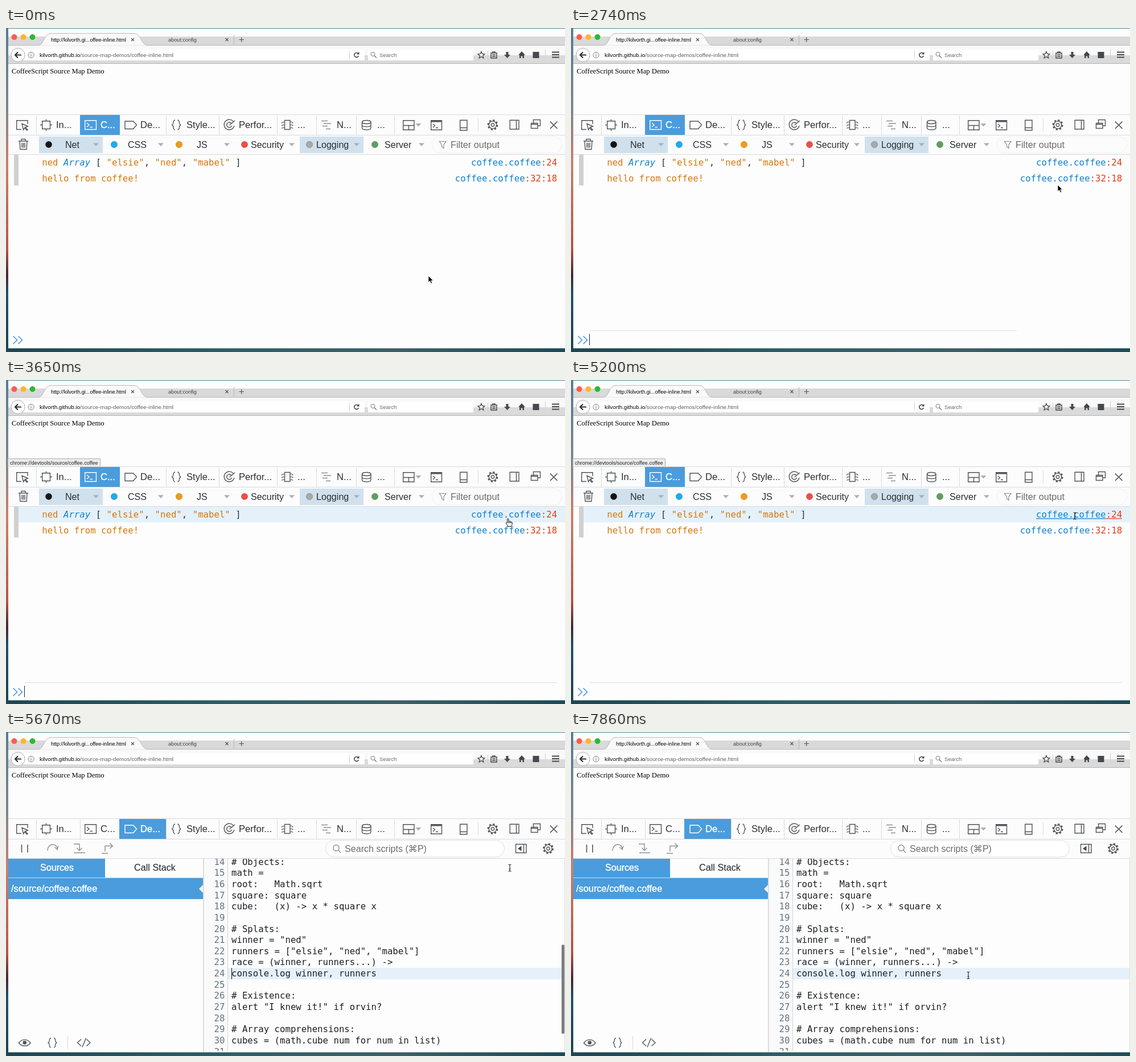
Write an HTML page that moves like this. It is 982 by 570 pixels and loops after 8 s.

```html
<!DOCTYPE html>
<html lang="en">
<head>
<meta charset="utf-8">
<title>Source map demo</title>
<style>
html, body { margin: 0; width: 100%; height: 100%; overflow: hidden; }
svg { display: block; width: 982px; height: 570px; }
text { white-space: pre; font-family: "Liberation Sans", Arial, sans-serif; fill: #2b2f33; }
.mono text { font: 15.7px "DejaVu Sans Mono", Menlo, monospace; }
.page { font-family: "Liberation Serif", Times, serif; }
.strong { stroke: #fff; stroke-width: .4; }
.icon { fill: none; stroke: #50555a; stroke-width: 1.4; }
.thin { stroke-width: 1.2; }
.dim { stroke: #8b8f93; }
.fillIcon { fill: #45494d; }
.line { fill: none; stroke: #d8dadc; }
.tri { fill: #a9b0b8; }
</style>
</head>
<body>
<svg viewBox="0 0 982 570">
  <defs>
    <linearGradient id="desk" x1="0" y1="0" x2="0" y2="1">
      <stop offset="0" stop-color="#527f92"/><stop offset=".25" stop-color="#7f8790"/>
      <stop offset=".42" stop-color="#c98070"/><stop offset=".68" stop-color="#b4574a"/>
      <stop offset=".76" stop-color="#4a2a36"/><stop offset=".82" stop-color="#1f5266"/>
      <stop offset="1" stop-color="#1b4554"/>
    </linearGradient>
    <linearGradient id="floor">
      <stop offset="0" stop-color="#1d4652"/><stop offset=".4" stop-color="#2c5f66"/>
      <stop offset=".7" stop-color="#3b5f66"/><stop offset="1" stop-color="#1c4a58"/>
    </linearGradient>
    <clipPath id="codeArea"><rect x="348" y="223" width="634" height="338"/></clipPath>
    <g id="gear" class="icon">
      <circle r="8.2" stroke-width="2.6" stroke-dasharray="3.2 3.24"/>
      <circle r="6.6"/><circle r="2.8"/>
    </g>
    <path id="tri" class="tri" d="M-5-2.5H5L0 3Z"/>
    <path id="cross" d="M-2.5-2.5 2.5 2.5M2.5-2.5-2.5 2.5"/>
  </defs>

  <!-- desktop and window -->
  <rect width="982" height="570" fill="url(#desk)"/>
  <rect y="563" width="982" height="7" fill="url(#floor)"/>
  <rect x="4" y="1" width="978" height="562.500" fill="#fdfdfd"/>
  <rect x="4" y="15" width="978" height="16" fill="#d9d9d9"/>
  <rect x="4" y="31" width="978" height="17" fill="#f9f9f9"/>
  <rect x="4" y="48" width="978" height="14" fill="#dadada"/>
  <path d="M4 62.5H982" stroke="#b4b4b4"/>
  <path d="M4 30.5H56C68 30 66 9.500 79 9.500H225C238 9.500 236 30 249 30.500H982" fill="#f9f9f9" stroke="#b9b9b9"/>
  <circle cx="14.500" cy="16" r="5" fill="#fc5b52"/>
  <circle cx="30.500" cy="16" r="5" fill="#fdb72a"/>
  <circle cx="46.500" cy="16" r="5" fill="#2bb932"/>
  <g class="icon thin">
    <use href="#cross" x="222.500" y="20.500"/><use href="#cross" x="388" y="20.500"/>
    <path d="M409.500 20.500H418M413.700 16.500V25"/>
  </g>
  <path d="M400.500 12V30" stroke="#bbb"/>

  <!-- address bar -->
  <path d="M30 37.500H630V57H30Z" fill="#fff"/>
  <rect x="636" y="38" width="185" height="19" fill="#fff"/>
  <path d="M603.500 40V55M846.500 40V55M947.500 37V55" stroke="#d0d0d0"/>
  <circle cx="21" cy="47.500" r="12" fill="#fff" stroke="#aaa"/>
  <path d="M27 47.500H17M21 42.500 16 47.500 21 52.500" fill="none" stroke="#333" stroke-width="2.200"/>
  <g fill="none" stroke="#777">
    <circle cx="44" cy="47.500" r="5"/><path d="M44 46.500V50.500M44 44V45.300"/>
    <circle cx="644.500" cy="46" r="3.500"/><path d="M647 48.500 651 52.500" stroke-width="1.500"/>
  </g>
  <path d="M619 45A4 4 0 1 0 619.500 49" fill="none" stroke="#444" stroke-width="1.600"/>
  <path d="M620.500 42V46.500H616Z" class="fillIcon"/>
  <path d="M835 41.500 836.700 45.500 841 46 837.800 48.800 838.800 53 835 50.700 831.200 53 832.200 48.800 829 46 833.300 45.500Z" fill="none" stroke="#45494d" stroke-width="1.300"/>
  <path d="M852 44H862V53H852ZM855 44V42H859V44M854 47H860M854 50H860" fill="none" stroke="#45494d" stroke-width="1.500"/>
  <path class="fillIcon" d="M878.500 42H882.500V47H886L880.500 53 875 47H878.500ZM906 41 912 47.500H910V53H907.500V49.500H904.500V53H902V47.500H900ZM959 41.500H972V43.500H959ZM959 46H972V48H959ZM959 50.500H972V52.500H959Z"/>
  <rect x="925.500" y="42" width="11" height="11" class="fillIcon"/>

  <g id="status">
    <rect x="3.500" y="138.500" width="162" height="15" fill="#ececec" stroke="#b0b0b0"/>
  </g>

  <!-- tool tabs -->
  <path d="M4 153H982V222H4Z" fill="#fcfcfc"/>
  <path class="line" d="M4 152.500H982M4 188.500H982M4 222.500H982M53.500 154V188M130.500 154V188M199.500 154V188M281.500 154V188M374.500 154V188M476.500 154V188M545.500 154V188M615.500 154V188M682.500 154V188M829.500 159V182"/>
  <rect id="activeTab" y="153" height="35" fill="#4a9cdc"/>
  <g class="icon">
    <path d="M27 178.500H18.700V162.700H38V169"/><path d="M28 168.500 38.500 173 34 174.500 38 179 36.500 180 32.800 175.700 30.500 179Z"/>
    <path d="M63.700 163.700H77.500V177.500H63.700ZM60 170.500H64M77.500 170.500H81M70.500 160.500V164M70.500 177.500V181"/>
    <path id="consoleIcon" d="M138.700 162.700H158.500V178.500H138.700ZM142 167 146 170.500 142 174M147.500 174.500H152"/>
    <path id="debugIcon" d="M209 164H223.500L229.500 170.500 223.500 177.500H209Z"/>
    <path d="M297 162C292 162 296 170.500 291 170.500 296 170.500 292 179 297 179M301.500 162C306.500 162 302.500 170.500 307.500 170.500 302.500 170.500 306.500 179 301.500 179"/>
    <path d="M400 165.500A9 9 0 1 0 401 172M396 168A4.500 4.500 0 1 0 396.500 172M392.500 171 402 163"/>
    <path d="M489.500 162.500H499V178.500H489.500Z"/>
    <path class="thin" d="M484 167.500 486 165.500H489M484 172 486 170.500H489M484 176.500 486 175.500H489M504.500 167.500 502.500 165.500H499.500M504.500 172 502.500 170.500H499.500M504.500 176.500 502.500 175.500H499.500"/>
    <path class="dim" d="M554 163.500H565M558 168H571M556 172.500H565M562 177.500H570"/>
    <path d="M625.500 165.500V176C625.500 180 641 180 641 176V165.500M625.500 171C625.500 174.500 641 174.500 641 171"/><ellipse cx="633.250" cy="165.500" rx="7.750" ry="3"/>
    <path d="M697.700 162.700H717V179.300H697.700ZM697.700 171.500H717M707.500 171.500V179.300"/>
    <path d="M746.700 162.700H765.500V179.300H746.700ZM750 169 753.500 172 750 175M755 175.500H759"/><path d="M746.700 164H765.500" stroke-width="3"/>
    <path d="M797.700 162.200H810V180H797.700ZM797.700 175.500H810"/>
    <path d="M885.200 162.200H901V178H885.200ZM896.500 162.200V178"/>
    <path d="M926.500 170V161.500H938.500V172H934M922.500 167.500H934V176.500H922.500ZM922.500 169.500H934"/>
    <path d="M956 164.500 968.500 177M968.500 164.500 956 177" stroke-width="1.700"/>
  </g>
  <use href="#gear" x="855" y="170.500"/><use href="#tri" x="724.500" y="170.500"/>
  <g id="labels"></g>

  <g id="console">
    <g id="filters"></g>
    <g class="icon">
      <path d="M22 199H39M27 199V195.500H34V199M24 199 25 213.500H36L37 199M28 202V210.500M30.500 202V210.500M33 202V210.500"/>
      <path class="dim thin" d="M761.500 199.500H773L769 205.500V211.500L765.500 209V205.500Z"/>
    </g>
    <rect x="748.500" y="191" width="228" height="29" rx="14.500" fill="none" stroke="#e8e8e8" stroke-dasharray="2 1"/>
    <rect id="hover" x="22" width="960" height="27.500" fill="#e4f1fb"/>
    <rect x="14" y="223" width="8" height="54" fill="#d0d0d0"/>
    <g id="rows" class="mono"></g>
    <path id="underline" stroke-width="1.200"/><path id="underlineNum" stroke="#ea3a12" stroke-width="1.200"/>
    <path d="M12.500 542 19.500 549 12.500 556M21.500 542 28.500 549 21.500 556" fill="none" stroke="#4a97e0" stroke-width="1.600"/>
    <path id="inputLine" stroke="#dedede"/>
    <path id="inputCaret" d="M32.500 538V558" stroke="#222"/>
  </g>

  <g id="debugger">
    <path d="M27.500 198V212M38 198V212" stroke="#50555a" stroke-width="1.600"/>
    <g class="icon dim">
      <path d="M73 209C73 195 89 195 90 205M85.500 202.500 90 207 92 200.500"/>
      <path d="M119 197H129V208M124.500 204 129 208.500 133.500 204M120 212.500H139"/>
      <path d="M174 210V200.500H187M182.500 196 187.500 200.500 182.500 205M168 213.500H179"/>
    </g>
    <rect x="561.500" y="190.500" width="314" height="29.500" rx="14.700" fill="#fff" stroke="#dedede"/>
    <g class="icon">
      <path class="dim" d="M585.200 204A5.200 5.200 0 1 0 574.800 204 5.200 5.200 0 1 0 585.200 204M584 208 588 212.500"/>
      <path d="M895.500 197.500H914V212.500H895.500ZM909.500 197.500V212.500"/>
    </g>
    <path d="M905.500 200.500V209.500L899 205Z" class="fillIcon"/>
    <use href="#gear" x="952.500" y="205"/>
    <rect x="4" y="223" width="342" height="340" fill="#fdfdfd"/>
    <rect x="4" y="223" width="170" height="33.500" fill="#4a9cdc"/>
    <path d="M4 256.500H346" stroke="#c8dcec"/>
    <rect x="4" y="257" width="342" height="37" fill="#4a9cdc"/>
    <path d="M346 269 339 276 346 283Z" fill="#f4f4f4"/>
    <path d="M347 223V563" stroke="#dcdcdc" stroke-width="2"/>
    <g class="icon">
      <path d="M22.500 547C28 539.500 37.500 539.500 43 547 37.500 554 28 554 22.500 547Z"/><circle cx="32.800" cy="546.500" r="2.600" fill="#50555a"/>
      <path d="M79 538.500C74.500 538.500 78 546.500 73.500 546.500 78 546.500 74.500 555 79 555M84 538.500C88.500 538.500 85 546.500 89.500 546.500 85 546.500 88.500 555 84 555"/>
      <path d="M132 540.500 125.500 546.500 132 552.500M141.500 540.500 148 546.500 141.500 552.500M140.500 538.500 134 554.500"/>
    </g>
    <path class="line" d="M108.500 535V558"/>
    <g clip-path="url(#codeArea)">
      <rect x="348" y="223" width="41" height="340" fill="#fafafa"/>
      <path d="M389.500 223V564" stroke="#d4d4d4"/>
      <rect x="390" y="415" width="592" height="20" fill="#e6f0fb"/>
      <g id="code" class="mono"></g>
    </g>
    <path id="codeCaret" d="M396.500 415V435" stroke="#111"/>
    <rect id="scrollbar" x="976" y="374" width="5" height="157" rx="2.500" fill="#7d7d7d"/>
    <path d="M981.500 223V563" stroke="#ddd"/>
  </g>

  <g id="cursor">
    <path id="arrow" d="M0 0V11.500L2.700 9 4.700 13.500 6.700 12.600 4.800 8.300H8.300Z" fill="#000" stroke="#fff" stroke-width=".8"/>
    <path id="hand" d="M-1.200 7V.8C-1.200-.5 1-.5 1 .8V5C1.400 4 3 4.200 3.200 5.200 3.800 4.500 5 4.800 5.200 5.800 6.200 5.300 7.200 6 7.200 7V9.500C7.200 11 6 12 6 13.500H-.5C-.8 11.500-2.600 10-3.600 7.800-4 6.500-2.500 6-1.200 7.500ZM1 5V8M3.200 5.500V8M5.200 6V8" fill="#fff" stroke="#111" stroke-width="1"/>
    <path id="beam" d="M-2.500-6C-1-6 0-5.500 0-4.500 0-5.500 1-6 2.500-6M0-4.500V4.500M-2.500 6C-1 6 0 5.500 0 4.500 0 5.500 1 6 2.500 6M-1.500 2H1.500" fill="none" stroke="#222" stroke-width="1.100"/>
  </g>
</svg>
<script>
const el = id => document.getElementById(id);
const root = document.querySelector("svg");
const NS = "http://www.w3.org/2000/svg";
const BLUE = "#1280cc", RED = "#ea3a12", ORANGE = "#d5770d", DARK = "#2b2f33";

function add(parent, tag, attrs) {
  const node = document.createElementNS(NS, tag);
  for (const key in attrs) node.setAttribute(key, attrs[key]);
  return parent.appendChild(node);
}

// Each run is a string or [string, colour, italic].
function label(parent, x, y, size, runs, fill = DARK, cls = "") {
  const node = add(parent, "text", { x, y, class: cls });
  if (size) node.style.fontSize = size + "px";
  node.style.fill = fill;
  for (const run of [].concat(runs)) {
    const [str, color, italic] = Array.isArray(run) ? run : [run];
    const span = add(node, "tspan", {});
    span.textContent = str;
    if (color) span.style.fill = color;
    if (italic) span.style.fontStyle = "italic";
  }
  return node;
}

// Browser chrome
label(root, 79, 24, 9.06, "http://kilvorth.gi...offee-inline.html", "#000");
label(root, 285, 24, 9.18, "about:config", "#444");
label(root, 59, 51, 9.83, [["kilvorth.github.io", "#000"], "/source-map-demos/coffee-inline.html"], "#606060");
label(root, 656, 51, 9.6, "Search", "#666");
label(root, 10, 80, 12.62, "CoffeeScript Source Map Demo", "#000", "page");
label(el("status"), 7, 149, 9.02, "chrome://devtools/source/coffee.coffee", "#222");

// Tool tabs
const tabs = [["In...", 88], ["C...", 166], ["De...", 236], ["Style...", 317], ["Perfor...", 409],
  ["...", 512], ["N...", 581], ["...", 652]].map(([str, x]) => label(el("labels"), x, 176.3, 16.6, str));

// Console filters: name, text x, dot x, dot colour, arrow x
const filters = [["Net", 104, 75, "#151515", 158], ["CSS", 214, 190, "#14aef5", 272],
  ["JS", 335, 304, "#f39c0c", 388], ["Security", 430, 419, "#f84b48", 502],
  ["Logging", 545, 533, "#a8a8a8", 616], ["Server", 665, 648, "#5f9f5f", 730]];
for (const x of [58, 516])
  add(el("filters"), "rect", { x, y: 191, width: 112, height: 29, fill: "#d0e1ed" });
for (const [name, x, cx, fill, arrow] of filters) {
  add(el("filters"), "circle", { cx, cy: 205, r: 5.7, fill, stroke: "#000", "stroke-opacity": .2 });
  label(el("filters"), x, 210.8, 16.1, name);
  add(el("filters"), "use", { href: "#tri", x: arrow, y: 205 });
}
label(el("console"), 781, 210.8, 16.3, "Filter output", "#6c6c6c");

// Console rows
const rows = el("rows");
label(rows, 63.2, 242, 0, ["ned ", ["Array", BLUE, true], [" [ ", DARK], '"elsie"', [", ", DARK],
  '"ned"', [", ", DARK], '"mabel"', [" ]", DARK]], ORANGE);
label(rows, 63.2, 269.6, 0, "hello from coffee!", ORANGE);
label(rows, 817, 242, 0, ["coffee.coffee", [":24", RED]], BLUE);
label(rows, 788.8, 269.6, 0, ["coffee.coffee", [":32:18", RED]], BLUE);
el("underline").setAttribute("stroke", BLUE);

// Debugger
const dbg = el("debugger");
label(dbg, 595, 210.8, 16.1, "Search scripts (⌘P)", "#6c6c6c");
label(dbg, 60, 243.8, 16.1, "Sources", "#fff", "strong");
label(dbg, 225, 243.8, 16.2, "Call Stack", "#1c1f22");
label(dbg, 9, 281.3, 16.37, "/source/coffee.coffee", "#fff", "strong");
const code = `# Objects:
math =
root:   Math.sqrt
square: square
cube:   (x) -> x * square x

# Splats:
winner = "ned"
runners = ["elsie", "ned", "mabel"]
race = (winner, runners...) ->
console.log winner, runners

# Existence:
alert "I knew it!" if orvin?

# Array comprehensions:
cubes = (math.cube num for num in list)
`;
code.split("\n").forEach((str, i) => {
  const y = 233.6 + i * 19.65;
  label(el("code"), 365.5, y, 0, String(14 + i), "#68737d");
  label(el("code"), 396, y, 0, str, "#1c1f22");
});
root.appendChild(el("cursor"));

// Motion
const path = [[0, 742, 436], [2110, 742, 436], [2740, 855, 276], [2920, 865, 267], [3300, 865, 267],
  [3500, 873, 257], [3650, 882, 244], [3860, 885, 239], [7040, 885, 239], [7650, 698, 428], [8000, 698, 428]];
const inputBlink = [60, 630, 1200, 1830, 2400, 2920, 3500, 4070, 4600, 5140];
const codeBlink = [5390, 5880, 6680, 6860, 7360, 7860];

const isOn = (times, t) => times.filter(x => x <= t).length % 2 === 1;
const show = (id, on) => el(id).setAttribute("visibility", on ? "inherit" : "hidden");

function cursorAt(t) {
  const i = Math.max(1, path.findIndex(p => p[0] > t));
  const [t0, x0, y0] = path[i - 1], [t1, x1, y1] = path[i];
  const p = (t - t0) / (t1 - t0), k = p * p * (3 - 2 * p);
  return [x0 + (x1 - x0) * k, y0 + (y1 - y0) * k];
}

function link(x, split, y) {
  el("underline").setAttribute("d", `M${x} ${y}H${split}`);
  el("underlineNum").setAttribute("d", `M${split} ${y}H968`);
}

function render(t) {
  const debug = t >= 5390;
  show("console", !debug);
  show("debugger", debug);
  el("activeTab").setAttribute("x", debug ? 199 : 130);
  el("activeTab").setAttribute("width", debug ? 82 : 70);
  el("consoleIcon").style.stroke = debug ? "" : "#fff";
  el("debugIcon").style.stroke = debug ? "#fff" : "";
  [1, 2].forEach(i => {
    const active = i === (debug ? 2 : 1);
    tabs[i].style.fill = active ? "#fff" : DARK;
    tabs[i].setAttribute("class", active ? "strong" : "");
  });

  const first = t >= 3650;
  show("hover", !debug && t >= 2920);
  el("hover").setAttribute("y", first ? 223 : 250);
  const lined = !debug && t >= 2920 && !(first && t < 3720);
  show("underline", lined);
  show("underlineNum", lined);
  if (first) link(817, 939.5, 243.8); else link(789, 911.5, 271.4);

  show("status", t >= 3150 && t < 5670);
  el("status").setAttribute("opacity", t < 3230 ? .5 : 1);
  show("inputLine", !debug && t >= 2400);
  el("inputLine").setAttribute("d", `M33 532.5H${t < 2920 ? 783 : 968}`);
  show("inputCaret", !debug && isOn(inputBlink, t));
  show("codeCaret", debug && isOn(codeBlink, t));
  show("scrollbar", debug && t < 5880);

  const [x, y] = cursorAt(t);
  el("cursor").setAttribute("transform", `translate(${x.toFixed(1)} ${y.toFixed(1)})`);
  show("arrow", t < 3000);
  show("hand", t >= 3000 && t < 5200);
  show("beam", t >= 5200);
}

const start = performance.now();
function tick(now) {
  render(Math.max(0, now - start) % 8000);
  requestAnimationFrame(tick);
}
render(0);
requestAnimationFrame(tick);
</script>
</body>
</html>
```
